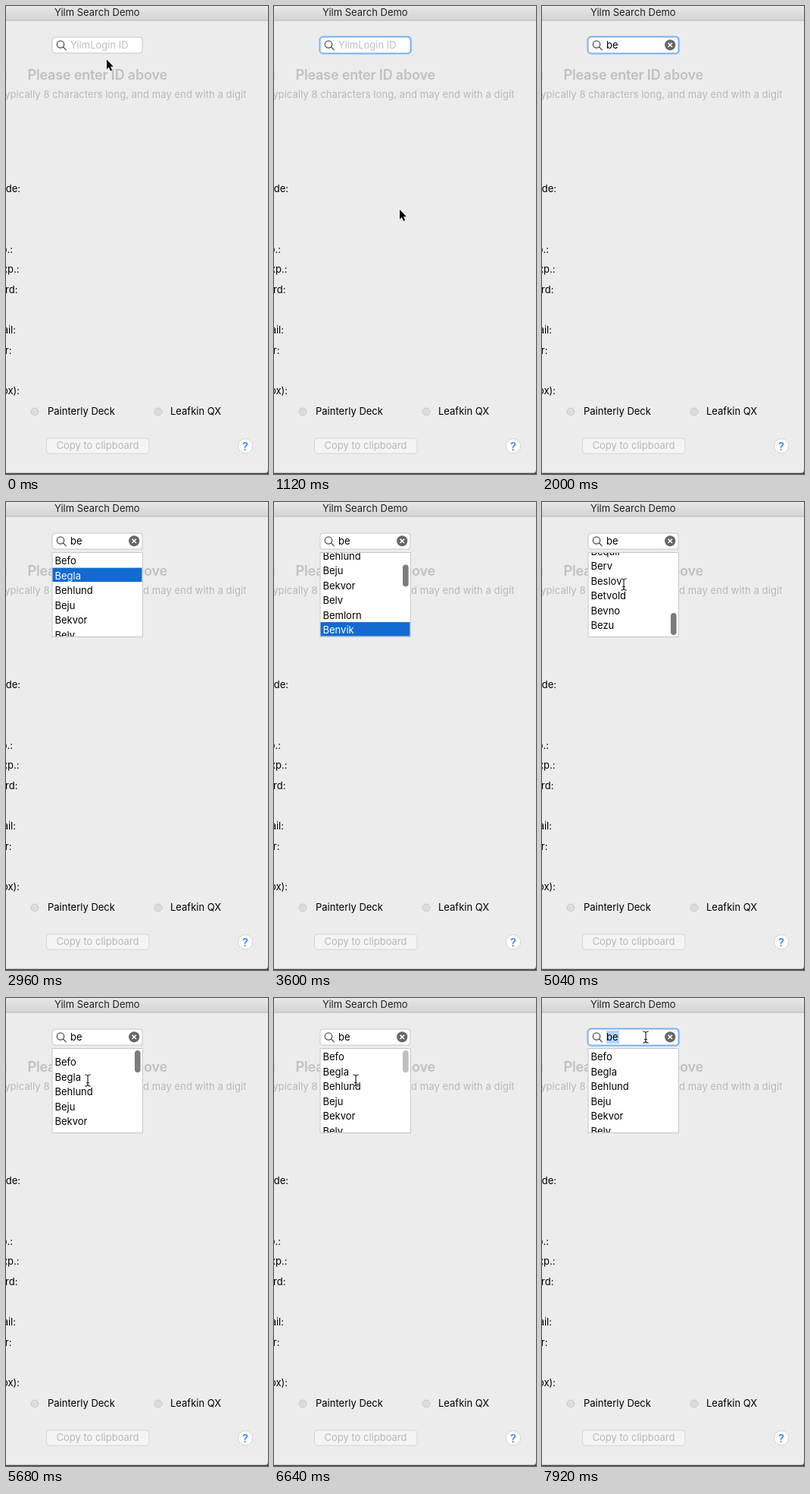
Write an HTML page that moves like this. It is 346 px wide and 616 px high and loops after 8 s.

```html
<!DOCTYPE html>
<html lang="en">
<head>
<meta charset="utf-8">
<title>Search demo</title>
<style>
  html, body { margin: 0; width: 100%; height: 100%; overflow: hidden; background: #ececec; }
  svg { display: block; width: 100%; height: 100%; }
  text { font: 13px Inter, "Liberation Sans", sans-serif; white-space: pre; }
  .dim { fill: #b8b8b8; }
  .hint { letter-spacing: 0.08px; }
  .head { font-size: 18px; font-weight: 600; letter-spacing: -0.18px; fill: #c0c0c0; }
</style>
</head>
<body>
<svg viewBox="0 0 346 616">
  <defs>
    <linearGradient id="bar" x2="0" y2="1">
      <stop stop-color="#e9e6e8"/><stop offset="1" stop-color="#d4d2d3"/>
    </linearGradient>
    <clipPath id="view"><rect x="61.5" y="67" width="118" height="110"/></clipPath>
  </defs>
  <rect width="346" height="616" fill="#ececec"/>
  <rect width="346" height="19" fill="url(#bar)"/>
  <rect y="18.5" width="346" height="1" fill="#b8b8b8"/>
  <text x="120.3" y="13.3" text-anchor="middle" fill="#222">Yilm Search Demo</text>

  <text class="head" x="-3" y="96.5">i</text>
  <text class="head" x="28.5" y="96.5">Please enter ID above</text>
  <text class="dim hint" x="317.5" y="121" text-anchor="end">Typically 8 characters long, and may end with a digit</text>
  <g id="labels" text-anchor="end"></g>

  <g fill="#dcdcdc" stroke="#c9c9c9">
    <circle cx="38" cy="534" r="4.9"/><circle cx="201" cy="534" r="4.9"/>
  </g>
  <text x="55" y="538">Painterly Deck</text>
  <text x="217" y="538">Leafkin QX</text>
  <rect x="53.5" y="569" width="135.5" height="20" rx="4" fill="#f4f4f4" stroke="#d6d6d6"/>
  <text class="dim" x="121" y="583.3" text-anchor="middle">Copy to clipboard</text>
  <circle cx="316" cy="579.3" r="9.7" fill="#fff" stroke="#d0d0d0"/>
  <text x="316" y="584.5" text-anchor="middle" fill="#2f80ec" style="font-size:15px;font-weight:500">?</text>
  <rect y="614.7" width="346" height="1.3" fill="#4c363c"/>
  <path d="M346 610V616H340Q346 616 346 610Z" fill="#4c363c"/>

  <rect id="ring" x="59.7" y="39.7" width="122" height="23.6" rx="5" fill="#74b0f2" stroke="#a3cbf7"/>
  <rect id="field" x="61" y="41" width="119" height="21" rx="3.5" fill="#fff"/>
  <g fill="none" stroke="#4a4a4a" stroke-width="1.2" stroke-linecap="round">
    <circle cx="72" cy="50.5" r="4.7"/><path d="M75.5 54L79.3 57.8"/>
  </g>
  <rect id="highlight" x="85" y="43" width="17" height="17" fill="#b2d5fc"/>
  <text id="query" x="85" y="56"></text>
  <g id="clear">
    <circle cx="169.2" cy="51.3" r="7.1" fill="#666"/>
    <path d="M166.5 48.6l5.4 5.4m0 -5.4l-5.4 5.4" stroke="#fff" stroke-width="1.5"/>
  </g>

  <g id="menu">
    <rect x="61" y="66.5" width="119.3" height="111" fill="#fff" stroke="#c6c6c6"/>
    <g clip-path="url(#view)">
      <g id="list"><rect id="selection" x="61" width="120" height="18.5" fill="#116bd0"/></g>
      <rect id="thumb" x="170" width="7.6" height="29" rx="3.8" fill="#7c7c7c"/>
    </g>
  </g>

  <path id="arrow" d="M0 0V12.8L2.8 10.1L5 15L7.1 14.1L5 9.3H8.8Z" stroke="#fff" stroke-width="1" paint-order="stroke"/>
  <g id="beam" fill="none" stroke-linecap="round">
    <path d="M-3.3 -7.5Q0 -7.5 0 -5V5Q0 7.5 -3.3 7.5M3.3 -7.5Q0 -7.5 0 -5V5Q0 7.5 3.3 7.5M-1.5 3H1.5" stroke="#fff" stroke-width="2.4"/>
    <path d="M-3.3 -7.5Q0 -7.5 0 -5V5Q0 7.5 -3.3 7.5M3.3 -7.5Q0 -7.5 0 -5V5Q0 7.5 3.3 7.5M-1.5 3H1.5" stroke="#222" stroke-width="1.2"/>
  </g>
</svg>
<script>
const LOOP = 8000, ROW = 19.5, VIEW = 110.5;
const NAMES = ("Befo Begla Behlund Beju Bekvor Belv Bemlorn Benvik Beoldin Beovarik " +
  "Bepland Bepsom Beqland Bequil Berv Beslov Betvold Bevno Bezu").split(" ");
const MAX_SCROLL = NAMES.length * ROW - VIEW + 1;
const $ = id => document.getElementById(id);

function addText(parent, content, x, y) {
  const node = document.createElementNS("http://www.w3.org/2000/svg", "text");
  node.textContent = content;
  node.setAttribute("x", x);
  node.setAttribute("y", y);
  parent.append(node);
  return node;
}

[["Code:", 19, 240], ["No.:", 9, 320], ["Exp.:", 17.5, 346.8], ["Card:", 15.5, 373.4],
 ["Mail:", 13, 426.7], ["Other:", 7.5, 453.4], ["(box):", 18, 506.7]]
  .forEach(([label, x, y]) => addText($("labels"), label, x, y + 4.5));

const rows = NAMES.map((name, i) => addText($("list"), name, 64.5, 82 + ROW * i));

const clamp = (v, lo, hi) => Math.min(hi, Math.max(lo, v));
const within = (t, from, to) => t >= from && t < to;

// Eased value along [time, value] keys.
function track(t, keys) {
  const next = keys.findIndex(key => key[0] > t);
  if (next === 0) return keys[0][1];
  if (next < 0) return keys[keys.length - 1][1];
  const [t0, a] = keys[next - 1], [t1, b] = keys[next];
  const p = (t - t0) / (t1 - t0);
  return a + (b - a) * p * p * (3 - 2 * p);
}

const show = (id, on) => $(id).setAttribute("visibility", on ? "visible" : "hidden");
const place = (id, x, y) => $(id).setAttribute("transform", `translate(${x} ${y})`);

function selectedRow(t) {
  if (t < 2560) return -1;
  if (t < 2800) return 0;
  return clamp(1 + Math.floor((t - 2990) / 95), 1, 7);
}

function scrollAt(t, selected) {
  if (t < 4640) return Math.max(0, ROW * (selected + 1) - VIEW);
  return track(t, [[4640, 45.5], [4960, MAX_SCROLL + 4], [5040, MAX_SCROLL + 4.7],
    [5200, MAX_SCROLL], [5280, MAX_SCROLL], [5600, -8.5], [5680, -7.5], [5920, 0]]);
}

function drawField(t) {
  const typed = t < 1680 ? "" : t < 1920 ? "b" : "be";
  const focused = within(t, 400, 2160) || t >= 7520;
  $("query").textContent = typed || "YilmLogin ID";
  $("query").setAttribute("fill", typed ? "#000" : "#bdbdbd");
  $("field").setAttribute("stroke", focused ? "#74b0f2" : "#c6c6c6");
  show("ring", focused);
  show("clear", typed);
  show("highlight", t >= 7680);
}

function drawMenu(t) {
  const selected = selectedRow(t), scroll = scrollAt(t, selected);
  show("menu", t >= 2160);
  place("list", 0, -scroll);
  $("selection").setAttribute("y", 67.1 + ROW * Math.max(0, selected));
  $("selection").setAttribute("opacity", selected < 0 ? 0 : 1);
  rows.forEach((row, i) => row.setAttribute("fill", i === selected ? "#fff" : "#000"));
  const progress = clamp(scroll / MAX_SCROLL, 0, 1);
  $("thumb").setAttribute("y", 69 + 77 * progress);
  $("thumb").setAttribute("opacity",
    track(t, [[3380, 0], [3400, 1], [3980, 1], [4160, 0], [4620, 0], [4660, 1], [6480, 1], [6800, 0]]));
}

function drawPointer(t) {
  const x = track(t, [[80, 133], [320, 136], [560, 136], [1040, 166], [4200, 166], [4560, 108], [6960, 108], [7400, 137]]);
  const y = track(t, [[80, 70.5], [320, 52], [560, 52], [1040, 268], [4200, 268], [4560, 108.5], [6960, 108.5], [7400, 51.5]]);
  const visible = t < 1680 || t >= 4240;
  const overField = x > 61 && x < 180 && y > 41 && y < 62;
  const useBeam = overField || (t > 4240 && y < 177);
  place("arrow", x, y);
  place("beam", x, y);
  show("arrow", visible && !useBeam);
  show("beam", visible && useBeam);
}

function render(t) {
  drawField(t);
  drawMenu(t);
  drawPointer(t);
}

const start = performance.now();
function tick() {
  render((performance.now() - start) % LOOP);
  requestAnimationFrame(tick);
}
tick();
</script>
</body>
</html>
```
